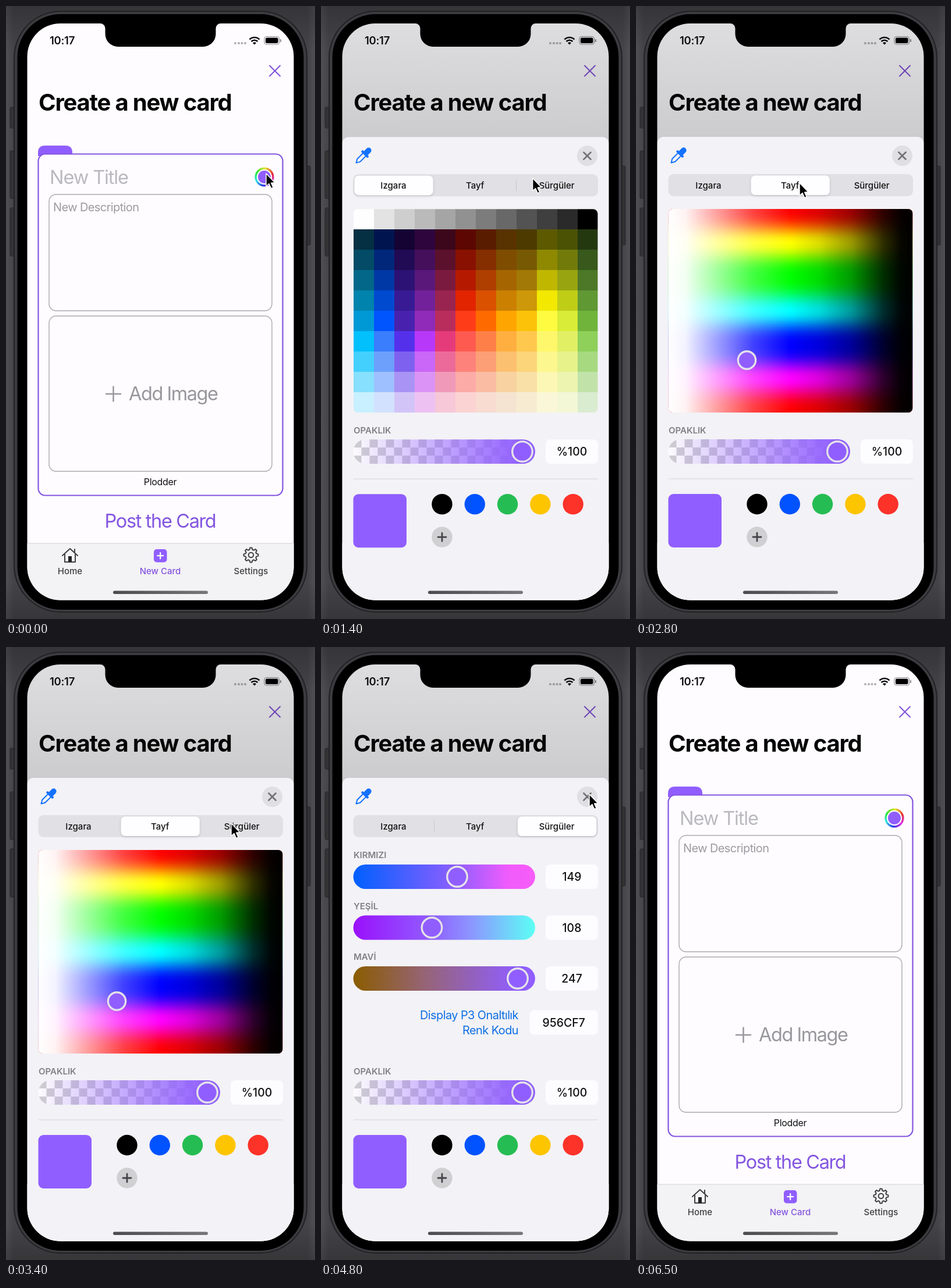
Write an HTML page that moves like this. It is 531x1054 px and loops after 6.6 s.

```html
<!DOCTYPE html>
<html lang="en">
<head>
<meta charset="utf-8">
<title>Card colour picker</title>
<style>
  html, body { margin: 0; width: 100%; height: 100%; overflow: hidden; background: #47464a; }
  svg { display: block; width: 100%; height: 100%; font-family: Inter, sans-serif; }
</style>
</head>
<body>
<svg id="stage" viewBox="0 0 531 1054"></svg>
<script>
const LOOP = 6600;
const PURPLE = '#905eff', SHEET = '#f3f2f6', GRAY = '#808085';
const range = n => [...Array(n).keys()];

// Drawing helpers
const text = (x, y, size, str, fill, weight = 400, spacing = 0, anchor = 'start') =>
  `<text x="${x}" y="${y}" font-size="${size}" fill="${fill}" font-weight="${weight}" letter-spacing="${spacing}em" text-anchor="${anchor}">${str}</text>`;
const centered = (x, y, size, str, fill, weight, spacing) => text(x, y, size, str, fill, weight, spacing, 'middle');
const rect = (x, y, w, h, r, fill, extra = '') =>
  `<rect x="${x}" y="${y}" width="${w}" height="${h}" rx="${r}" fill="${fill}" ${extra}/>`;
const circle = (x, y, r, fill, extra = '') => `<circle cx="${x}" cy="${y}" r="${r}" fill="${fill}" ${extra}/>`;
const line = (d, stroke, width, extra = '') =>
  `<path d="${d}" fill="none" stroke="${stroke}" stroke-width="${width}" stroke-linecap="round" stroke-linejoin="round" ${extra}/>`;
const cross = (x, y, r, stroke, width) => line(`M${x - r} ${y - r}l${2 * r} ${2 * r}m0 ${-2 * r}l${-2 * r} ${2 * r}`, stroke, width);
const plus = (x, y, r, stroke, width) => line(`M${x - r} ${y}h${2 * r}M${x} ${y - r}v${2 * r}`, stroke, width);
// Each stop is [offset, colour, opacity]
const gradient = (id, stops, vertical) =>
  `<linearGradient id="${id}" ${vertical ? 'x2="0" y2="1"' : ''}>` +
  stops.map(([o, c, a = 1]) => `<stop offset="${o}" stop-color="${c}" stop-opacity="${a}"/>`).join('') + '</linearGradient>';
const thumb = (x, y, r) =>
  circle(x, y, r + 1.9, '#0000', 'stroke="#000" stroke-opacity=".12" stroke-width="1"') +
  circle(x, y, r, PURPLE, 'stroke="#e5e1ea" stroke-width="3.4"');
const field = (x, y, w, value) =>
  rect(x, y, w, 42, 8, '#fdfcff') + centered(x + w / 2, y + 28, 19.5, value, '#111', 500);

// Fully saturated hue whose primaries spread wider than the mixes between them
function softHue(turn) {
  const channel = shift => {
    const v = Math.max(0, Math.min(1, Math.abs(((turn + shift) % 1) * 6 - 3) - 1));
    return Math.round(255 * (v * v * (3 - 2 * v)) ** 1.4);
  };
  return `rgb(${[1, 2 / 3, 1 / 3].map(channel)})`;
}

const defs = `<defs>
  <clipPath id="screen">${rect(36.5, 30, 458, 991.5, 57, '#000')}</clipPath>
  <clipPath id="panel">${rect(55.5, 349, 420, 350, 8, '#000')}</clipPath>
  <clipPath id="track">${rect(55.5, 745, 312.5, 42, 21, '#000')}</clipPath>
  <filter id="soft" x="-20%" y="-30%" width="140%" height="170%"><feDropShadow dx="0" dy="1.5" stdDeviation="2" flood-opacity=".16"/></filter>
  ${gradient('wall', [[0, '#505054'], [.025, '#444347'], [.975, '#444347'], [1, '#505054']])}
  ${gradient('vignette', [[0, '#000', .22], [.07, '#000', 0], [.94, '#000', 0], [1, '#000', .2]], true)}
  ${gradient('hues', range(49).map(i => [i / 48, softHue(i / 48)]), true)}
  ${gradient('white', [[0, '#fff'], [.07, '#fff', .95], [.2, '#fff', .62], [.35, '#fff', .25], [.5, '#fff', 0]])}
  ${gradient('black', [[.5, '#000', 0], [.62, '#000', .14], [.75, '#000', .4], [.88, '#000', .82], [.95, '#000', .97], [1, '#000']])}
  ${gradient('shade', [[0, '#000', 0], [1, '#000', .085]], true)}
  ${gradient('opacity', [[0, PURPLE, 0], [.93, PURPLE], [1, PURPLE]])}
  ${gradient('red', [[0, '#0060ff'], [.57, PURPLE], [.85, '#f05cfc'], [1, '#f75cf8']])}
  ${gradient('green', [[0, '#9a10fb'], [.43, PURPLE], [.65, '#8c96ff'], [1, '#5cfff5']])}
  ${gradient('blue', [[0, '#8a5c00'], [.4, '#966478'], [.9, PURPLE], [1, PURPLE]])}
  ${gradient('bar', [[0, '#4c4b4e'], [1, '#777679']])}
</defs>`;

const device = rect(0, 0, 531, 1054, 0, 'url(#wall)') + rect(0, 0, 531, 1054, 0, 'url(#vignette)') +
  [[174, 36], [249, 82], [347, 83]].map(([y, h]) => rect(7, y, 8, h, 2, '#333235', 'stroke="#252427"')).join('') +
  rect(515, 275, 8, 136, 2, '#333235', 'stroke="#252427"') +
  rect(14, 9, 503, 1033, 80, '#3c3b3f', 'stroke="#222124" stroke-width="2"') +
  rect(19.5, 14, 492, 1024, 74, '#000');

const notch = '<path d="M162 29V30A8.500 8.500 0 0 1 170.500 38.500V48A22 22 0 0 0 192.500 70H338.500A22 22 0 0 0 360.500 48V38.500A8.500 8.500 0 0 1 369 30V29z"/>';

const statusBar = text(75, 66, 18.5, '10:17', '#111', 600, -.015) +
  [394, 400, 405.500, 411].map(x => circle(x, 64, 2, '#b0afb3')).join('') +
  line('M418.500 57.500A12 12 0 0 1 435.500 57.500M421.500 61A8 8 0 0 1 432.500 61', '#111', 2.6, 'style="stroke-linecap:butt"') +
  '<path d="M424 63.500A4.500 4.500 0 0 1 430 63.500L427 66.500z"/>' +
  rect(444, 52.500, 25.500, 13.500, 4, 'none', 'stroke="#8b8a8e" stroke-width="1.2"') +
  rect(446, 54.500, 21.500, 9.500, 2.2, '#000') + rect(471, 57, 2, 5, 1, '#8b8a8e');

function colorWell(x, y) {
  const point = a => `${x + 14.9 * Math.cos(a)} ${y - 14.9 * Math.sin(a)}`;
  const step = Math.PI / 18;
  return range(36).map(i =>
    `<path d="M${point(i * step)}L${point((i + 1.15) * step)}" stroke="hsl(${i * 10 - 20},78%,54%)" stroke-width="3.4"/>`).join('') +
    circle(x, y, 11, PURPLE);
}

function gear(x, y) {
  const points = range(96).map(i => {
    const a = i / 96 * 2 * Math.PI;
    const r = 11 + 1.5 * Math.max(-1, Math.min(1, 2 * Math.cos(8 * a)));
    return `${x + r * Math.cos(a)} ${y + r * Math.sin(a)}`;
  });
  return line(`M${points.join('L')}z`, '#3f3e42', 2) + circle(x, y, 4.3, 'none', 'stroke="#3f3e42" stroke-width="2"');
}

const box = (y, h) => rect(74, y, 383, h, 12, 'none', 'stroke="#aaa9ad" stroke-width="1.4"');
const page = rect(36, 30, 459, 992, 0, '#fefcff') + statusBar +
  cross(462, 111.5, 9, '#8050d8', 2) +
  text(56, 179.5, 40, 'Create a new card', '#050505', 700, -.03) +
  '<path d="M55 258V252Q55 240 67 240H102Q114 240 114 252V258z" fill="#905eff"/>' +
  rect(55.5, 254.5, 420, 587, 12, '#fefcff', 'stroke="#8354df" stroke-width="2.2"') +
  text(75, 306, 32.5, 'New Title', '#bab9bd', 400, -.034) + colorWell(444, 294) +
  box(324, 200) + text(81, 353, 20, 'New Description', '#9c9b9f', 400, -.03) +
  box(533, 267) + plus(184.5, 667, 12.5, '#98979b', 2.5) +
  text(211, 678, 32.5, 'Add Image', '#98979b', 400, -.045) +
  centered(265, 824, 16, 'Plodder', '#111', 400, -.02) +
  centered(265, 897, 32.5, 'Post the Card', '#8355e0', 400, -.042) +
  rect(36, 924, 459, 98, 0, '#f3f2f4') + rect(36, 923.5, 459, 1, 0, '#d3d2d6') +
  line('M97 945L110 933L123 945M101 943V956H119V943M118 939V934', '#3f3e42', 2) + rect(107, 946, 6, 10, 0, '#222') +
  rect(254, 934, 22.5, 22.5, 5, PURPLE) + plus(265.2, 945.2, 5, '#fff', 2.2) + gear(421, 944) +
  centered(110, 977, 15, 'Home', '#3f3e42', 500) + centered(265, 977, 15, 'New Card', '#8355e0', 500) +
  centered(421, 977, 15, 'Settings', '#3f3e42', 500);

// Swatch colours at five key rows; the rows between are blended
const KEY_ROWS = [[1, '052f43 00154f 150334 2e063d 3c071b 5c0701 5a1c00 583300 4d3a00 5c5900 4b5204 243810'],
  [4, '0083ac 004ad0 371a94 72219a 99244f e22400 da5100 cb8001 cd9809 f2e800 c0cd17 609834'],
  [5, '0099d6 0055ff 4822ae 902ab8 b92d5d ff3c18 ff6a00 ffa501 fcc20a fefb41 d9ec37 70b43c'],
  [6, '01c0fc 3a7dfd 5530eb b838fa e63b7a fe5a50 fe8048 feaf3f fec84e fff76b e1ef65 8ed05a'],
  [9, 'c8f0ff d2e2fe d3c4f8 edc2f3 f6c8d8 fbd3d2 f8dcd2 f5e4d2 f7ecd2 faf7d8 f3f7d6 daecd0']]
  .map(([row, list]) => [row, list.split(' ').map(c => [0, 2, 4].map(i => parseInt(c.substr(i, 2), 16)))]);

function swatch(row, col) {
  if (row === 0) {
    const v = col === 0 ? 254 : col === 11 ? 0 : 247 - col * 20.5;
    return `rgb(${v},${v},${v})`;
  }
  const k = Math.max(1, KEY_ROWS.findIndex(([r]) => r >= row));
  const [[r0, from], [r1, to]] = [KEY_ROWS[k - 1], KEY_ROWS[k]];
  const f = (row - r0) / (r1 - r0);
  return `rgb(${from[col].map((v, i) => Math.round(v + (to[col][i] - v) * f))})`;
}

const gridTab = `<g clip-path="url(#panel)" shape-rendering="crispEdges">${range(120).map(i => {
  const row = Math.floor(i / 12), col = i % 12;
  return rect(55.5 + col * 35, 349 + row * 35, 35, 35, 0, swatch(row, col));
}).join('')}</g>`;

const spectrumTab = `<g clip-path="url(#panel)">${['hues', 'white', 'black'].map(id =>
  rect(55.5, 349, 420, 350, 0, `url(#${id})`)).join('')}</g>` + thumb(190.5, 609, 15.2);

const channel = (y, label, id, x, value) =>
  text(56, y - 11, 15, label, GRAY, 600) + rect(55.5, y, 312.5, 42, 21, `url(#${id})`) +
  thumb(x, y + 21, 17.3) + field(386, y, 90, value);
const slidersTab = channel(374, 'KIRMIZI', 'red', 234, 149) + channel(461.5, 'YEŞİL', 'green', 190.5, 108) +
  channel(549, 'MAVİ', 'blue', 338, 247) +
  text(339, 639.5, 20, 'Display P3 Onaltılık', '#0f6fe2', 400, -.03, 'end') +
  text(339, 665.5, 20, 'Renk Kodu', '#0f6fe2', 400, -.03, 'end') + field(358.5, 624.5, 117.5, '956CF7');

const checker = range(69).filter(i => (i % 23 + Math.floor(i / 23)) % 2 === 0)
  .map(i => rect(55.5 + i % 23 * 14, 745 + Math.floor(i / 23) * 14, 14, 14, 0, '#cfced2')).join('');
const opacitySlider = text(56, 735, 15, 'OPAKLIK', GRAY, 600) +
  `<g clip-path="url(#track)">${rect(55, 745, 314, 42, 0, '#fcfbfd')}${checker}${rect(55.5, 745, 312.5, 42, 0, 'url(#opacity)')}</g>` +
  thumb(346, 766, 17.3) + field(386, 745, 90, '%100');

const dropper = `<g transform="translate(72.500 257.500) rotate(45)">${rect(-4.8, -18, 9.6, 15, 4.8, '#1472ff')}${rect(-8, -6.5, 16, 4.2, 2.1, '#1472ff')}` +
  line('M-3.500 -3V11L0 17L3.500 11V-3', '#1472ff', 2) + '</g>';

const sheet = rect(36, 25, 459, 210, 0, 'url(#shade)', 'id="shade-above"') + rect(36.5, 225, 458, 900, 11, SHEET) + dropper +
  circle(457.5, 257.5, 17.5, '#e0dfe3') + cross(457.5, 257.5, 6, '#737276', 2.8) +
  rect(55.5, 289, 420.5, 38, 9, '#e1e0e4') +
  rect(194, 298, 1, 20, 0, '#c8c7cb', 'id="divider-left"') + rect(335, 298, 1, 20, 0, '#c8c7cb', 'id="divider-right"') +
  rect(57.5, 291.5, 135, 33.5, 7, '#fefdff', 'id="pill" filter="url(#soft)"') +
  ['Izgara', 'Tayf', 'Sürgüler'].map((s, i) => centered(124.5 + i * 140.3, 313.5, 15, s, '#111', 500)).join('') +
  [gridTab, spectrumTab, slidersTab].map((tab, i) => `<g id="tab${i}">${tab}</g>`).join('') +
  opacitySlider + rect(56, 812.5, 420, 1, 0, '#d6d5d9') + rect(55.5, 839, 91.5, 92, 9, PURPLE) +
  ['#000', '#0153ff', '#25bd53', '#fdc400', '#fd3229'].map((c, i) => circle(208 + i * 56.3, 856.5, 17.7, c)).join('') +
  circle(208, 913, 17.7, '#d0cfd1') + plus(208, 913, 7, '#454448', 2.8);

document.getElementById('stage').innerHTML = defs + device +
  `<g clip-path="url(#screen)">${page}${rect(36, 30, 459, 992, 0, '#000', 'id="dim"')}<g id="sheet">${sheet}</g></g>` +
  notch + rect(184, 1005.5, 163, 5.5, 2.75, 'url(#bar)') +
  '<path id="cursor" d="M0 0V22L5 17.600L8.600 25.800L12.200 24.200L8.700 16.300L15 15.800z" stroke="#fff" stroke-width="1.5" stroke-linejoin="round"/>';

// Motion
const OPEN = 230, TO_SPECTRUM = 1965, TO_SLIDERS = 3690, CLOSE = 5030;
const CURSOR = [[0, 447, 288], [1050, 447, 288], [1750, 281, 304], [3050, 281, 304], [3400, 387, 303],
  [4250, 387, 303], [4750, 461, 253], [5700, 461, 253], [6100, 545, 330], [LOOP, 545, 330]];
const el = id => document.getElementById(id);
const set = (id, name, value) => el(id).setAttribute(name, value);
const spring = (ms, rate) => {
  const x = Math.max(0, ms) / 1000 * rate;
  return 1 - (1 + x) * Math.exp(-x);
};

function cursorAt(t) {
  const i = CURSOR.findIndex(([time]) => time > t);
  const [t0, x0, y0] = CURSOR[i - 1], [t1, x1, y1] = CURSOR[i];
  const f = (t - t0) / (t1 - t0), e = f * f * (3 - 2 * f);
  return [x0 + (x1 - x0) * e, y0 + (y1 - y0) * e];
}

function render(t) {
  const shown = spring(t - OPEN, 9.6) - spring(t - CLOSE, 10);
  set('sheet', 'transform', `translate(0 ${(1 - shown) * 800})`);
  set('sheet', 'display', shown > .001 ? 'inline' : 'none');
  set('dim', 'opacity', shown * .125);
  set('shade-above', 'opacity', shown);

  const slide = spring(t - TO_SPECTRUM, 16.5) + spring(t - TO_SLIDERS, 16.5);
  set('pill', 'x', 57.5 + slide * 140.3);
  set('divider-left', 'opacity', Math.max(0, slide - 1));
  set('divider-right', 'opacity', Math.max(0, 1 - slide));
  const active = t < TO_SPECTRUM + 60 ? 0 : t < TO_SLIDERS + 60 ? 1 : 2;
  range(3).forEach(i => set('tab' + i, 'display', i === active ? 'inline' : 'none'));

  set('cursor', 'transform', `translate(${cursorAt(t)})`);
}

const start = performance.now();
function frame() {
  render((performance.now() - start) % LOOP);
  requestAnimationFrame(frame);
}
frame();
</script>
</body>
</html>
```
